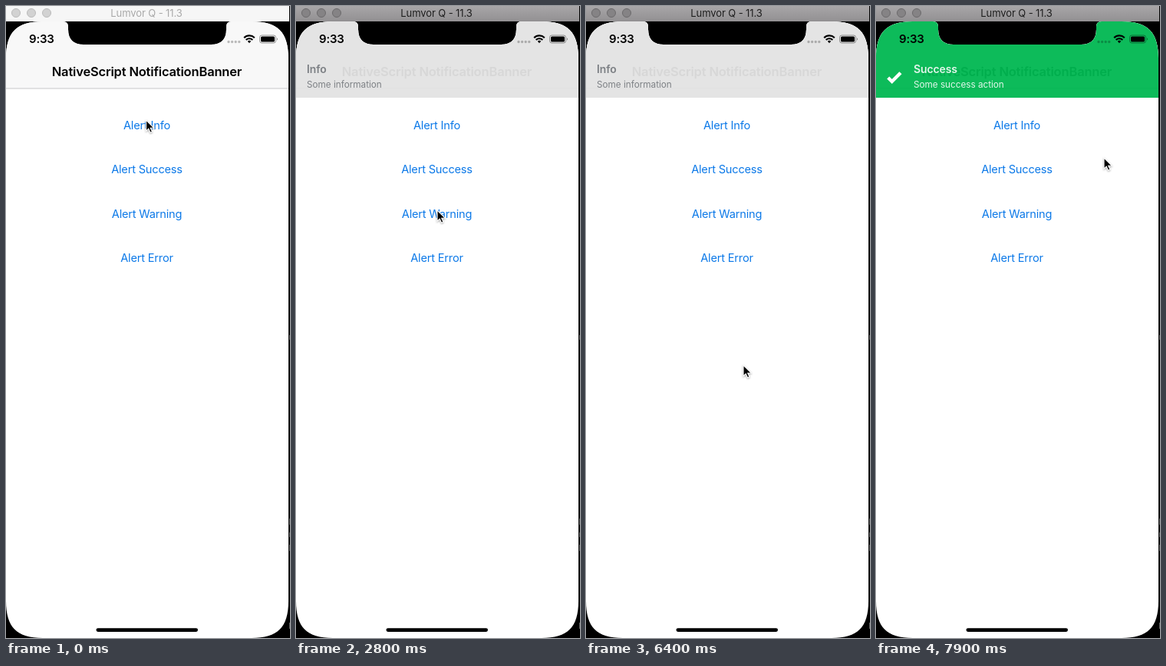
These frames come from a looping animation (370x820 px, 8 s). An HTML page:

```html
<!DOCTYPE html>
<html lang="en">
<head>
<meta charset="utf-8">
<title>Notification banner</title>
<style>
  html, body { margin: 0; width: 100%; height: 100%; overflow: hidden; background: #000; }
  svg { display: block; font-family: Inter, Roboto, sans-serif; }
  .mid { text-anchor: middle; }
  .semi { font-weight: 600; }
  .link { font-size: 14.6px; letter-spacing: -.2px; fill: #0c79e8; }
  .head { font-size: 14px; letter-spacing: -.1px; font-weight: 600; }
  .sub { font-size: 11.75px; letter-spacing: -.02px; }
  #window { --bar: url(#on); --ink: #1e1e1e; --dot: #858385; --ring: #6c6a6c; }
  #window.idle { --bar: #f6f6f6; --ink: #a9a9a9; --dot: #d2d2d2; --ring: #bbb; }
  #window rect { fill: var(--bar); }
  #window text { fill: var(--ink); font-size: 13px; letter-spacing: -.1px; }
  #window circle { fill: var(--dot); stroke: var(--ring); }
</style>
</head>
<body>
<svg width="370" height="820" viewBox="0 0 370 820">
  <defs>
    <linearGradient id="on" x2="0" y2="1">
      <stop stop-color="#a8a6a8"/><stop offset="1" stop-color="#929092"/>
    </linearGradient>
    <clipPath id="screen">
      <path d="M0 68C0 34 14 20 48 20H74Q81 20 81 27V30Q81 50 101 50H267Q287 50 287 30V27Q287 20 294 20H320C354 20 368 34 368 68V772C368 806 354 820 320 820H48C14 820 0 806 0 772Z"/>
    </clipPath>
  </defs>

  <path d="M369.5 427v6m0 232v8m0 10v6m0 10v8m0 93v8" stroke="#666"/>

  <g id="window">
    <rect width="369" height="20"/>
    <circle cx="13" cy="9" r="5.5"/><circle cx="33" cy="9" r="5.5"/><circle cx="53" cy="9" r="5.5"/>
    <text class="mid" x="183" y="14">Lumvor Q - 11.3</text>
  </g>

  <g clip-path="url(#screen)">
    <rect y="20" width="368" height="800" fill="#fff"/>
    <rect y="20" width="368" height="87" fill="#f8f8f8"/>
    <path d="M0 107H368" stroke="#c6c6c8"/>
    <text class="mid semi" x="183.5" y="91" font-size="16.5" letter-spacing="-.17">NativeScript NotificationBanner</text>
    <g class="mid link">
      <text x="183.5" y="160">Alert Info</text>
      <text x="183.5" y="217">Alert Success</text>
      <text x="183.5" y="274.5">Alert Warning</text>
      <text x="183.5" y="331.5">Alert Error</text>
    </g>

    <g id="info" fill="#7d8085">
      <rect y="-80" width="368" height="199" fill="#e3e3e3" opacity=".95"/>
      <text class="head" x="14" y="87">Info</text>
      <text class="sub" x="14" y="106">Some information</text>
    </g>
    <g id="success" fill="#fff">
      <rect y="-80" width="368" height="199" fill="#00b852" opacity=".95"/>
      <path d="M15.8 93L20.8 98L32 86.7" fill="none" stroke="#fff" stroke-width="4.4"/>
      <g opacity=".88">
        <text class="head" x="49" y="87">Success</text>
        <text class="sub" x="49" y="106">Some success action</text>
      </g>
    </g>

    <text class="semi" x="30" y="48" font-size="15" letter-spacing="-.2">9:33</text>
    <path d="M290 46.5h15" stroke="#000" stroke-opacity=".25" stroke-width="3.4" stroke-linecap="round" stroke-dasharray="0 4.6"/>
    <g fill="none" stroke="#000" stroke-width="2.2">
      <path d="M310.2 41.2a9.7 9.7 0 0 1 13.6 0M312.7 44a6.2 6.2 0 0 1 8.6 0"/>
      <path d="M317 48.2l-2.2-2.4a3.2 3.2 0 0 1 4.4 0z" fill="#000" stroke="none"/>
    </g>
    <rect x="330.5" y="38" width="21" height="10" rx="2.8" fill="none" stroke="#000" stroke-opacity=".4"/>
    <rect x="332" y="39.5" width="18" height="7" rx="1.5"/>
    <path d="M353 41.3q2 1.7 0 3.4z" opacity=".45"/>
    <rect x="117.5" y="807.3" width="132.5" height="4.6" rx="2.3"/>
  </g>

  <path id="cursor" d="M0 0V14.2L3.2 11.2L5.5 16.3L8 15.2L5.7 10.2H10.2Z" stroke="#fff" stroke-width="1.1" style="filter:drop-shadow(0 1px 1px #0005)"/>
</svg>
<script>
const LOOP = 8000, STEP = 100, HIDDEN = -119;
const INFO_IN = 200, INFO_OUT = 6400, SUCCESS_IN = 6660;
const $ = id => document.getElementById(id);
const clamp = v => Math.min(1, Math.max(0, v));
const ease = v => v * v * (3 - 2 * v);

// Each pointer move: start time, end time, x and y of the tip at its end
const moves = [
  [0, 0, 182.5, 148],
  [450, 900, 183, 207],
  [1400, 1800, 184, 265],
  [2850, 3300, 190, 327],
  [4050, 4450, 205, 466],
  [7200, 7900, 297, 197]
];

function pointer(t) {
  let [, , x, y] = moves[0];
  for (const [start, end, toX, toY] of moves.slice(1)) {
    const k = ease(clamp((t - start) / (end - start)));
    x += (toX - x) * k;
    y += (toY - y) * k;
  }
  return [x, y];
}

// Damped spring from 0 to 1 with a slight overshoot
function spring(ms) {
  if (ms <= 0) return 0;
  const s = ms / 1000, decay = 17.3, freq = 13;
  return 1 - Math.exp(-decay * s) * (Math.cos(freq * s) + decay / freq * Math.sin(freq * s));
}

const move = (id, x, y) => $(id).setAttribute("transform", `translate(${x} ${y})`);

function draw(now) {
  const t = Math.floor(now % LOOP / STEP) * STEP;
  const leave = ease(clamp((t - INFO_OUT) / (SUCCESS_IN - INFO_OUT)));
  $("window").classList.toggle("idle", t < 100);
  move("info", 0, HIDDEN * (1 - spring(t - INFO_IN) + leave));
  move("success", 0, HIDDEN * (1 - spring(t - SUCCESS_IN)));
  move("cursor", ...pointer(t));
  requestAnimationFrame(draw);
}
draw(performance.now());
</script>
</body>
</html>
```
